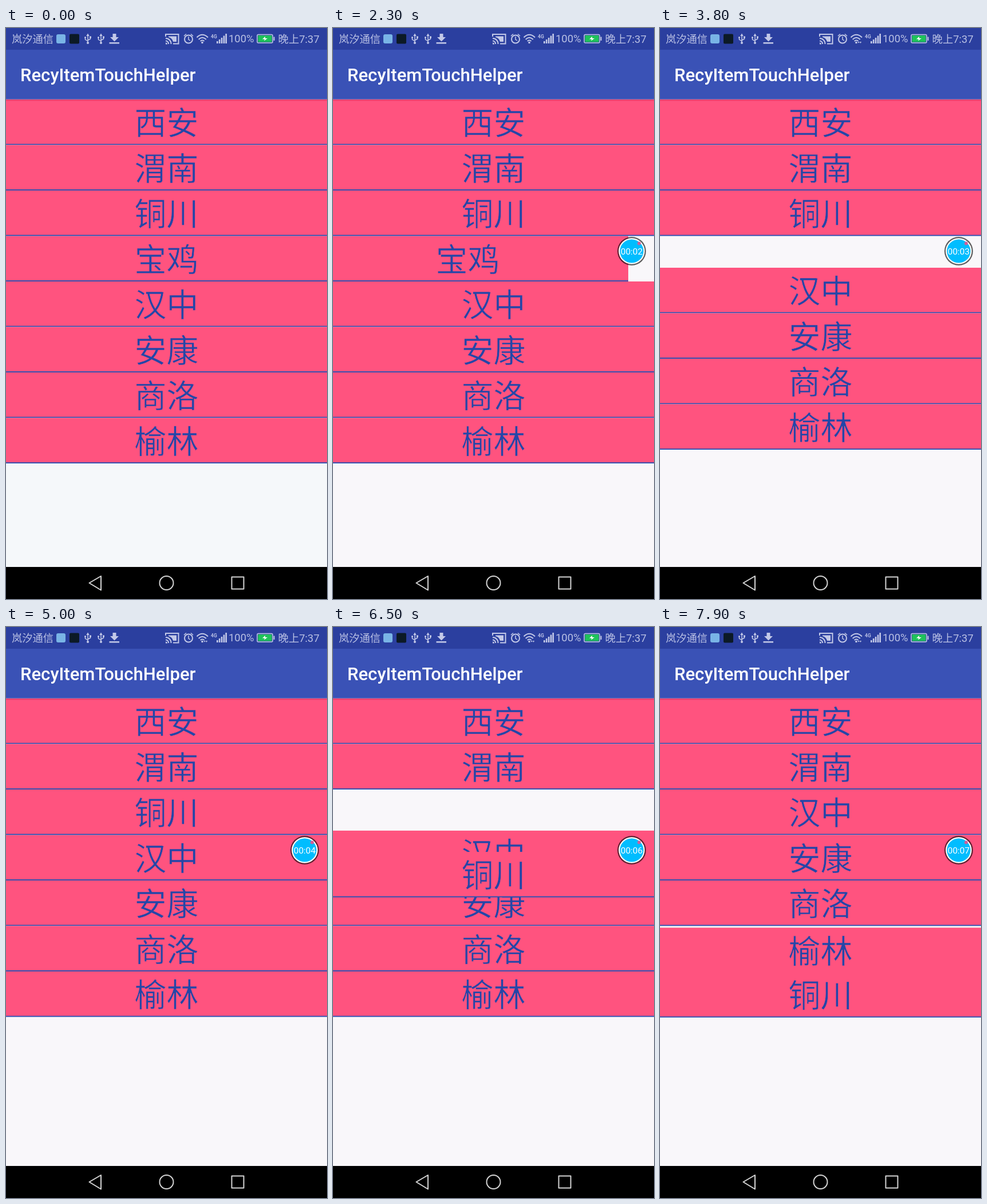
An HTML page for the animation above (8 s loop, 561x998 px).

```html
<!DOCTYPE html>
<html lang="zh-CN">
<head>
<meta charset="utf-8">
<title>RecyItemTouchHelper</title>
<style>
html, body { margin: 0; width: 100%; height: 100%; overflow: hidden; background: #f9f7fa; }
svg { display: block; }
#stage { width: 100vw; height: 100vh; }
text { font-family: Roboto, "Noto Sans CJK SC", "Noto Sans CJK", sans-serif; }
.status text { font-size: 18.4px; fill: #b9c0e4; }
.line { fill: none; stroke: #c3c9e8; stroke-width: 2; }
.thin { stroke-width: 1.5; }
.solid { fill: #c3c9e8; }
.list text {
  font: 56px "Noto Sans CJK SC", "Noto Sans CJK", sans-serif;
  fill: #2446a8; stroke: #ff537f; stroke-width: .6; text-anchor: middle;
}
.bubble text { font-size: 15.4px; fill: #fff; }
.nav { fill: none; stroke: #d4d4d4; stroke-width: 2; stroke-linejoin: round; }

/* Everything advances in 100 ms ticks: 1.25% of the loop. */
.page, .swipe, .drag, .close, .up1, .up2, .up3, .up4, .bubble, .digit, .data {
  animation: 8s step-end -4ms infinite;
}
.page { animation-name: page; }
.swipe { animation-name: swipe; }
.drag { animation-name: drag; }
.close { animation-name: close; }
.up1 { animation-name: up1; }
.up2 { animation-name: up2; }
.up3 { animation-name: up3; }
.up4 { animation-name: up4; }
.bubble { animation-name: show; }
.digit { animation-name: count; }
.data { animation-name: data; }

@keyframes page {
  0% { fill: #f5f8fa; }
  1.25%, 100% { fill: #f9f7fa; }
}
@keyframes swipe {
  0% { translate: 0 0; }
  17.5% { translate: 0 0; animation-timing-function: steps(9); }
  28.75% { translate: -45px 0; animation-timing-function: steps(8); }
  38.75% { translate: -184px 0; }
  40% { translate: -225px 0; }
  41.25% { translate: -335px 0; }
  42.5% { translate: -465px 0; }
  43.75%, 100% { translate: -562px 0; }
}
@keyframes close {
  0% { translate: 0 0; }
  46.25% { translate: 0 -3px; }
  47.5% { translate: 0 -24px; }
  48.75% { translate: 0 -57px; }
  50% { translate: 0 -76px; }
  51.25%, 100% { translate: 0 -79.5px; }
}
@keyframes drag {
  0% { translate: 0 0; }
  70% { translate: 0 0; animation-timing-function: steps(5); }
  76.25% { translate: 0 35px; animation-timing-function: steps(4); }
  81.25% { translate: 0 109px; animation-timing-function: steps(3); }
  85% { translate: 0 155px; animation-timing-function: steps(3); }
  88.75% { translate: 0 248px; animation-timing-function: steps(4); }
  93.75% { translate: 0 300px; animation-timing-function: steps(2); }
  96.25%, 100% { translate: 0 319px; }
}
@keyframes up1 {
  0% { translate: 0 0; }
  81.25% { translate: 0 -7.6px; }
  82.5% { translate: 0 -52px; }
  83.75%, 100% { translate: 0 -79.5px; }
}
@keyframes up2 {
  0% { translate: 0 0; }
  86.25% { translate: 0 -1.6px; }
  87.5% { translate: 0 -38px; }
  88.75% { translate: 0 -77px; }
  90%, 100% { translate: 0 -79.5px; }
}
@keyframes up3 {
  0% { translate: 0 0; }
  90% { translate: 0 -23px; }
  91.25% { translate: 0 -69px; }
  92.5%, 100% { translate: 0 -79.5px; }
}
@keyframes up4 {
  0% { translate: 0 0; }
  96.25% { translate: 0 -1.3px; }
  97.5% { translate: 0 -37px; }
  98.75%, 100% { translate: 0 -76.5px; }
}
@keyframes show {
  0% { opacity: 0; animation-timing-function: steps(3); }
  3.75%, 100% { opacity: 1; }
}
@keyframes count {
  0% { translate: 0 0; }
  16.25% { translate: 0 -20px; }
  28.75% { translate: 0 -40px; }
  41.25% { translate: 0 -60px; }
  53.75% { translate: 0 -80px; }
  66.25% { translate: 0 -100px; }
  78.75% { translate: 0 -120px; }
  91.25%, 100% { translate: 0 -140px; }
}
@keyframes data {
  0% { opacity: 0; }
  37.5%, 100% { opacity: 1; }
}
</style>
</head>
<body>
<svg id="stage" viewBox="0 0 561 998" preserveAspectRatio="none">
  <defs>
    <g id="row">
      <rect width="561" height="79" fill="#ff537f"/>
      <rect y="77.6" width="561" height="1.9" fill="#2d50b2"/>
    </g>
    <g id="usb">
      <path class="line thin" d="M0 -6V7M-4.5 -2V1L0 4M4.5 -3V0L0 2.5"/>
      <path class="solid" d="M0 -9.5L2.7 -5H-2.7Z"/>
      <circle class="solid" cy="7" r="2"/>
      <circle class="solid" cx="-4.5" cy="-2.5" r="1.5"/>
      <rect class="solid" x="3" y="-4.5" width="3" height="3"/>
    </g>
    <linearGradient id="shade" x2="0" y2="1">
      <stop stop-color="#c81f50" stop-opacity=".6"/>
      <stop offset="1" stop-color="#c81f50" stop-opacity="0"/>
    </linearGradient>
  </defs>

  <rect class="page" width="561" height="998" fill="#f9f7fa"/>

  <g class="list">
    <g transform="translate(0 125)"><use href="#row"/><text x="280.5" y="61">西安</text></g>
    <g transform="translate(0 204.5)"><use href="#row"/><text x="280.5" y="61">渭南</text></g>
    <g class="swipe" transform="translate(0 363.5)"><use href="#row"/><text x="280.5" y="61">宝鸡</text></g>
    <g class="close">
      <g class="up1" transform="translate(0 443)"><use href="#row"/><text x="280.5" y="61">汉中</text></g>
      <g class="up2" transform="translate(0 522.5)"><use href="#row"/><text x="280.5" y="61">安康</text></g>
      <g class="up3" transform="translate(0 602)"><use href="#row"/><text x="280.5" y="61">商洛</text></g>
      <g class="up4" transform="translate(0 681.5)"><use href="#row"/><text x="280.5" y="61">榆林</text></g>
    </g>
    <g class="drag" transform="translate(0 284)"><use href="#row"/><text x="280.5" y="61">铜川</text></g>
  </g>

  <rect y="124.5" width="561" height="4" fill="url(#shade)"/>
  <rect y="37" width="561" height="87.6" fill="#3a52b6"/>
  <text x="25" y="93" font-size="31.1" font-weight="500" fill="#fff">RecyItemTouchHelper</text>

  <rect width="561" height="38" fill="#2b3f9f"/>
  <g class="status">
    <text x="10" y="26" style="font-size:18.3px">岚汐通信</text>
    <rect x="88" y="11" width="16" height="16" rx="3" fill="#79b4e6"/>
    <rect x="111" y="10.5" width="17" height="17" rx="2" fill="#0c1a26"/>
    <use href="#usb" x="143" y="19"/>
    <use href="#usb" x="166" y="19"/>
    <path class="solid" d="M186.500 10H192.500V16H197L189.500 23.500L182 16H186.500ZM180.500 25H198V27.500H180.500Z"/>

    <path class="line" d="M279 15V11H301.500V27.500H292M279 18A9.500 9.500 0 0 1 288.500 28M279 22.500A5 5 0 0 1 284 28"/>
    <path class="solid" d="M279 25.500A3 3 0 0 1 282 28.500H279ZM284 14.500H298V24H292Q290 17 284 16Z"/>
    <circle class="line" cx="319" cy="19.5" r="7"/>
    <path class="line thin" d="M319 15V20L322 22M311 14L315 10.500M327 14L323 10.500"/>
    <path class="line" d="M333.500 16.500Q343 7 353 16.500M336.700 20Q343 13.500 349.800 20M339.700 23Q343 20 346.500 23"/>
    <circle class="solid" cx="343" cy="25.5" r="1.8"/>
    <path class="data solid" d="M345.700 26L347.200 23.200L348.700 26ZM349 24L350.500 27L352 24Z"/>
    <text x="358" y="18" style="font-size:8.5px;font-weight:700">4G</text>
    <path class="solid" d="M368 23h2.600v4h-2.600zM371.900 20h2.600v7h-2.600zM375.800 17h2.600v10h-2.600zM379.700 13.500h2.600v13.500h-2.600zM383.400 10h2.600v17h-2.600z"/>
    <text x="389" y="25">100%</text>
    <rect class="line thin" x="439" y="11.5" width="27" height="14.5" rx="2"/>
    <rect x="440.5" y="13" width="24" height="11.5" fill="#1fc25a"/>
    <rect class="solid" x="467.5" y="15.5" width="2" height="6.5"/>
    <path d="M453 15L448 19.500H452L451 22.500L457 18H453Z" fill="#fff"/>
    <text x="475.5" y="26">晚上7:37</text>
  </g>

  <g class="bubble">
    <circle cx="522" cy="390" r="25" fill="#000" fill-opacity=".62"/>
    <circle cx="522" cy="390" r="22.8" fill="#fff"/>
    <circle cx="522" cy="390" r="20.6" fill="#00bdff"/>
    <circle cx="535" cy="376.5" r="3" fill="#cf5f9c"/>
    <text x="502.8" y="396">00:0</text>
    <svg x="532.5" y="381" width="10" height="19" overflow="hidden">
      <text class="digit" y="15"><tspan x="0">0</tspan><tspan x="0" dy="20">1</tspan><tspan x="0" dy="20">2</tspan><tspan x="0" dy="20">3</tspan><tspan x="0" dy="20">4</tspan><tspan x="0" dy="20">5</tspan><tspan x="0" dy="20">6</tspan><tspan x="0" dy="20">7</tspan></text>
    </svg>
  </g>

  <rect y="942" width="561" height="56" fill="#000"/>
  <g class="nav">
    <path d="M145.500 970L166 958V982.500Z"/>
    <circle cx="280.5" cy="970" r="12"/>
    <rect x="394.5" y="959.5" width="21" height="21"/>
  </g>
</svg>
</body>
</html>
```
